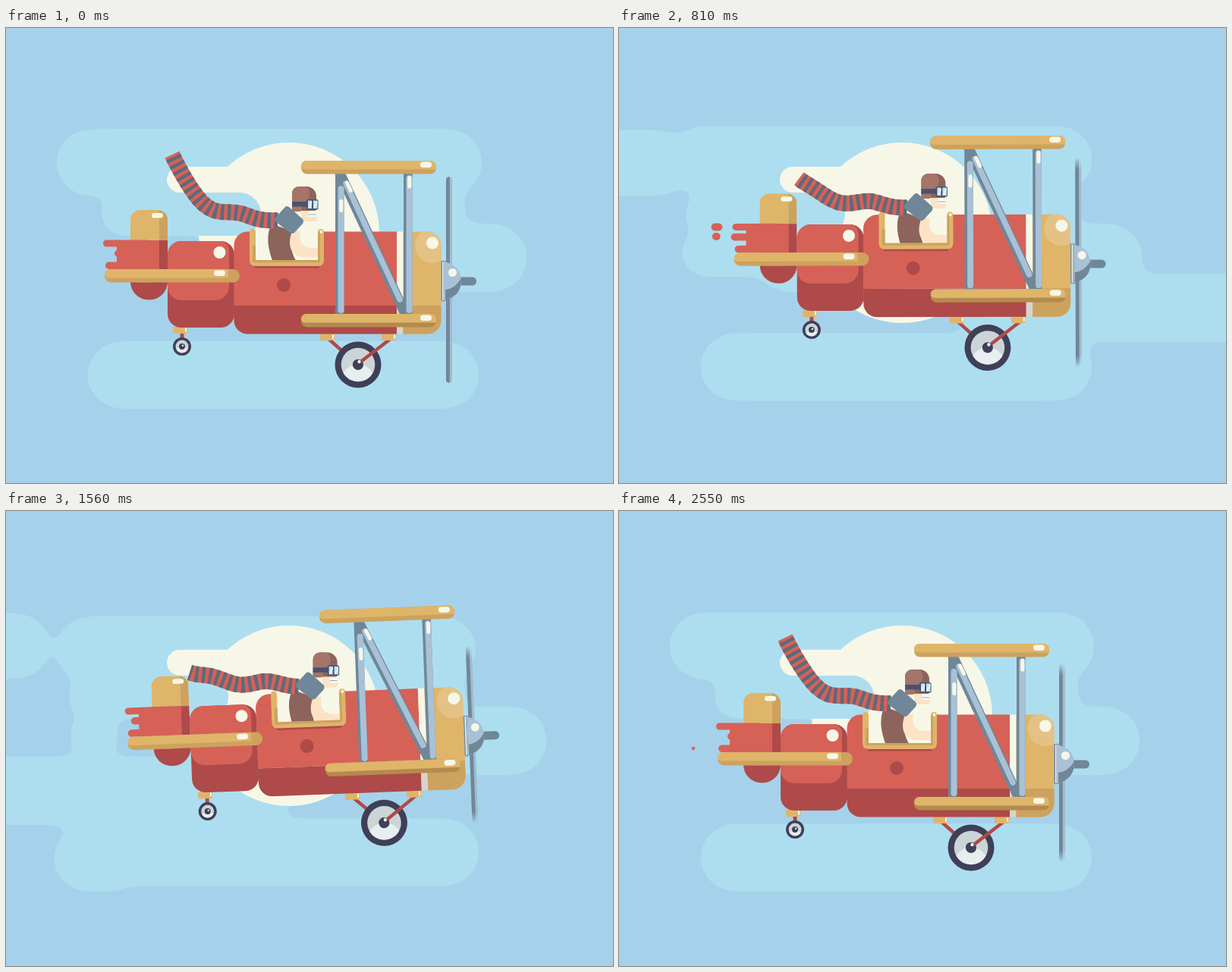
Animation of 800x600 px, one loop 2580 ms. Source, as an HTML page with a canvas:

```html
<!DOCTYPE html>
<html lang="en">
<head>
<meta charset="utf-8">
<title>Biplane</title>
<style>
  html, body { margin: 0; width: 100%; height: 100%; overflow: hidden; background: #a5d2ea; }
  svg, canvas { position: absolute; left: 0; top: 0; width: 800px; height: 600px; }
</style>
</head>
<body>
<svg id="sky" width="800" height="600" viewBox="0 0 800 600">
  <filter id="goo" filterUnits="userSpaceOnUse" x="-60" y="0" width="920" height="600" color-interpolation-filters="sRGB">
    <feGaussianBlur stdDeviation="10"/>
    <feColorMatrix values="0 0 0 0 .678  0 0 0 0 .871  0 0 0 0 .937  0 0 0 24 -11.3"/>
  </filter>
  <g id="clouds" filter="url(#goo)" stroke="#addeef"></g>
</svg>
<canvas id="stage" width="800" height="600"></canvas>
<script>
const LOOP = 2580, STEP = 30, TURN = 2 * Math.PI;
const C = {
  cloud: '#addeef', cream: '#f7f7e8', red: '#d66157', darkRed: '#ae4a49',
  gold: '#dfb56a', darkGold: '#cda25e', bronze: '#b58a4e', dome: '#e4c285',
  steel: '#6f8798', lightSteel: '#a9c1d6', ink: '#3f4058',
  brown: '#8c645c', helmet: '#a67468', skin: '#fce3c6', slate: '#5d6a7b'
};
const ctx = document.getElementById('stage').getContext('2d');
const lerp = (a, b, u) => a + (b - a) * u;

// Straight moves between [time, value] points, held at both ends.
function ramp(t, ...points) {
  const i = points.findIndex(([time]) => time > t);
  if (i === 0) return points[0][1];
  if (i < 0) return points[points.length - 1][1];
  const [t0, a] = points[i - 1], [t1, b] = points[i];
  return lerp(a, b, (t - t0) / (t1 - t0));
}

const shift = t => ramp(t, [0, 0], [1365, 36.4], [2550, 0]);
const tilt = t => ramp(t, [750, 0], [1890, -3.05], [2550, 0]);
const veil = t => ramp(t, [0, 0], [1250, 59], [2390, 0]);
const midFinger = t => 133 + 10 * Math.cos(2 * TURN * t / LOOP);

// Half the visible length of the blade, spinning 13 turns per loop with a slight sway
function bladeLength(t) {
  const turn = TURN * t / LOOP;
  return 150 * Math.abs(Math.cos(.44 + 13 * turn - .65 * Math.sin(turn) ** 2));
}

const sky = document.getElementById('clouds');
function cloud(left, right, top, height) {
  const el = document.createElementNS(sky.namespaceURI, 'path');
  el.setAttribute('stroke-width', height);
  el.setAttribute('stroke-linecap', 'round');
  sky.append(el);
  return t => {
    const r = height / 2, x0 = left(t) + r, x1 = Math.max(x0 + .1, right(t) - r);
    el.setAttribute('d', `M${x0} ${top(t) + r}H${x1}`);
  };
}
const stripEnd = t => 785 - .8 * (t - 1050);
const clouds = [
  // upper bank and the blob it sheds to the left
  cloud(() => 66, t => ramp(t, [570, 628], [1300, 616], [2100, 627]),
    t => ramp(t, [500, 133.5], [1050, 126], [1700, 142.5], [2500, 134]), 88),
  cloud(t => ramp(t, [200, 67], [570, 40], [1050, -150]),
    t => ramp(t, [0, 160], [1050, 76], [1560, 58], [1890, -60]), () => 135, 86),
  // veil in front of the sun and the puff below it
  cloud(t => 125 - veil(t), t => 336 - veil(t), () => 217, 57),
  cloud(t => ramp(t, [0, 260], [720, 82], [1560, 84], [1850, 260]),
    t => ramp(t, [0, 324], [1000, 250], [1560, 142], [1850, 324]), () => 264, 64),
  // middle bank and the filling above it
  cloud(t => ramp(t, [0, 300], [570, 185], [1050, 170], [1400, 300]),
    t => ramp(t, [700, 687], [1560, 713], [2400, 687]), () => 258, 90),
  cloud(() => 270, () => 606, () => 200, 80),
  // long strip passing through
  cloud(t => stripEnd(t) - 530, stripEnd, () => 324, 90),
  // lower bank and the blob it sheds
  cloud(() => 107, () => 624, t => ramp(t, [0, 413], [1150, 398], [1950, 412.5]), 89),
  cloud(t => ramp(t, [1050, 107], [1890, 34], [2250, -110]),
    t => ramp(t, [1050, 270], [1890, 124], [2280, -20]),
    t => ramp(t, [0, 414], [1050, 400], [1500, 414.5]), 87)
];

// Shape helpers; boxes are given by their edges
function box(color, x0, y0, x1, y1, r = 0) {
  ctx.fillStyle = color;
  ctx.beginPath();
  ctx.roundRect(x0, y0, x1 - x0, y1 - y0, r);
  ctx.fill();
}
const pill = (color, x0, y0, x1, y1) => box(color, x0, y0, x1, y1, Math.min(x1 - x0, y1 - y0) / 2);
function disc(color, x, y, r) {
  ctx.fillStyle = color;
  ctx.beginPath();
  ctx.arc(x, y, r, 0, TURN);
  ctx.fill();
}
function shape(color, d) {
  ctx.fillStyle = color;
  ctx.fill(new Path2D(d));
}
function line(color, width, d, cap = 'butt') {
  ctx.strokeStyle = color;
  ctx.lineWidth = width;
  ctx.lineCap = cap;
  ctx.stroke(new Path2D(d));
}
function clipped(x0, y0, x1, y1, r, draw) {
  ctx.save();
  ctx.beginPath();
  ctx.roundRect(x0, y0, x1 - x0, y1 - y0, r);
  ctx.clip();
  draw();
  ctx.restore();
}

function drawSun(t) {
  disc(C.cream, 373, 270, 119);
  box(C.cream, 212, 183, 310, 217, [17, 0, 0, 17]);
  box(C.cloud, 240, 217, 336 - veil(t), 274, [0, 28, 28, 0]);
  const p = (t - 850) / 400;
  if (p > 0 && p < 1) disc(C.cream, 212 - 92 * p, 201, 17 * Math.sqrt(1 - p));
}

// Droplets torn off the tail in bursts; the lowest row joins every second burst.
function drawDrops(t) {
  const rows = [[284, 91, 0], [296.5, 102, -60], [313, 98, 70]];
  [400, 740, 1780, 2140].forEach((burst, i) => rows.forEach(([y, rest, delay], row) => {
    const p = (t - burst - delay) / 420;
    if (p <= 0 || p >= 1 || (row === 2 && i % 2 === 0)) return;
    const r = 5 * (1 - p ** 3), w = r * (1 + Math.max(0, .9 - 2.5 * p));
    const x = lerp(132, rest, 1 - (1 - p) ** 5);
    pill(C.red, x - w, y - r, x + w, y + r);
  }));
}

function drawTail(t) {
  clipped(164, 240, 213, 358.5, [13, 13, 24, 24], () => {
    box(C.gold, 164, 240, 202, 280);
    box(C.darkGold, 202, 240, 213, 280);
    box(C.darkRed, 164, 280, 213, 359);
    box(C.red, 164, 280, 202, 336, [0, 0, 12, 12]);
  });
  pill(C.cream, 192, 244, 207, 250.5);
  box(C.red, 146, 280, 202, 318);
  pill(C.red, 128, 279.5, 190, 288.5);
  pill(C.red, midFinger(t), 292.5, 190, 302);
  pill(C.red, 131, 308.5, 190, 318);
  drawDrops(t);
}

function drawWheel(x, y, r, inner, hub) {
  disc(C.ink, x, y, r);
  disc('#cbd4d6', x, y, inner);
  clipped(x - inner, y - inner, x + inner, y + inner, inner,
    () => disc('#e8edef', x, y + inner, inner * 1.02));
  disc(C.ink, x, y, hub);
}

function drawGear() {
  box(C.darkRed, 229.5, 402, 234.5, 412);
  drawWheel(232, 420, 12, 8.5, 4);
  disc(C.cream, 233, 418.8, 1.2);
  line(C.darkRed, 4.5, 'M424 409L460 441');
  drawWheel(464, 444, 30.5, 22.3, 7);
  line(C.darkRed, 4.5, 'M508 409L465 442');
  disc(C.ink, 463.5, 443.5, 6.5);
  disc(C.cream, 465.5, 440, 2.2);
  for (const [x, y] of [[220, 394], [414, 403], [495, 403]]) {
    box(C.gold, x, y, x + 19, y + 9, 2);
    box(C.cream, x + 16, y + 1, x + 18, y + 7, 1);
  }
}

function drawFuselage() {
  box(C.darkRed, 213, 281, 301, 395, 18);
  box(C.red, 213, 281, 294, 359, [18, 12, 18, 18]);
  disc(C.cream, 281.5, 296, 8);
  clipped(300.5, 268.5, 573.5, 403.5, 18, () => {
    box(C.red, 300, 268, 515, 366);
    box(C.darkRed, 300, 366, 515, 404);
    box(C.cream, 515, 268, 523.5, 366);
    box('#d6d5cc', 515, 366, 523.5, 404);
    box(C.gold, 523.5, 268, 574, 404);
    box(C.darkGold, 523.5, 366, 574, 404);
    disc(C.dome, 562, 287, 23);
  });
  disc(C.cream, 562, 283.5, 8);
  disc(C.darkRed, 366, 339, 9);
  pill(C.darkGold, 130, 318, 308, 335.5);
  box(C.gold, 130, 318, 293, 329.5, [8, 4, 0, 5]);
  pill(C.cream, 274, 319.5, 289, 327);
  box(C.darkRed, 327, 312, 413, 316.5, 3);
  box(C.cream, 326, 268, 414, 309);
}

// The free end curls up and sinks as the plane climbs; a ripple runs towards it.
function drawScarf(t) {
  const s = shift(t), curl = 81 - 2.25 * s, length = 139 + .15 * s;
  let d = '';
  for (let u = 0; u <= 1.001; u += .025) {
    const x = 358 - length * u;
    const ripple = 4 * Math.min(1, 3 * u) * Math.cos(TURN * ((x - 264) / 85 + 3 * t / LOOP));
    const y = 248 + 6 * (1 - u) ** 3 - curl * u ** 4 + ripple * (1 - u ** 6);
    d += `${d ? 'L' : 'M'}${x} ${y}`;
  }
  line(C.red, 21, d);
  ctx.setLineDash([4.5, 4.5]);
  line(C.slate, 21, d);
  ctx.setLineDash([]);
}

function drawPilot(t) {
  shape(C.brown, 'M350 258C343 272 343 290 356 318H389C377 300 373 290 377 268Z');
  shape(C.skin, 'M378 266C370 284 374 301 392 302H414V290H402C389 289 386 280 388 268Z');
  drawScarf(t);
  shape(C.skin, 'M389 238H411L413 241H410V251Q410 255 405 255H390Z');
  shape(C.cream, 'M399 240H411V249H399Z');
  box(C.brown, 377, 209, 409, 241, [9, 13, 2, 3]);
  box(C.helmet, 377, 209, 400, 229, [9, 8, 8, 0]);
  box(C.helmet, 377, 234, 390, 242, [0, 0, 3, 3]);
  box('#4a5270', 377, 229, 398, 235.5);
  box('#4a5270', 396, 226, 411.5, 239.5, 2);
  box('#bfe3f3', 398, 227.5, 403, 238);
  box('#bfe3f3', 405, 227.5, 410.5, 238);
  line(C.cream, 1.6, 'M399 237L403 229M406 237L410 229');
  box('#ffffff', 399, 244, 409, 248, 1);
  line('#7ea3bd', 1, 'M399 246H409');
  shape(C.steel, 'M355 250L368 236Q370 234 373 236L391 252Q393 255 391 258L380 270Q377 272 374 270L355 255Q353 253 355 250Z');
}

function drawCockpit() {
  shape(C.gold, 'M321 269a4 4 0 0 1 8 0V306H411V269a4 4 0 0 1 8 0V306Q419 314 411 314H329Q321 314 321 306Z');
  shape(C.darkGold, 'M325 287H329V306H411V270H414V309H325Z');
  pill(C.cream, 414, 266.5, 417, 271);
}

function drawPropeller(t) {
  const half = bladeLength(t), x = 584, y = 332, fade = t ? Math.min(16, half / 2) : 0;
  const paint = rgb => {
    const g = ctx.createLinearGradient(0, y - half, 0, y + half);
    const edge = fade / (2 * half), end = fade ? 0 : 1;
    [[0, end], [edge, 1], [1 - edge, 1], [1, end]]
      .forEach(([stop, a]) => g.addColorStop(stop, `rgba(${rgb},${a})`));
    return g;
  };
  ctx.save();
  ctx.globalAlpha = Math.min(1, .25 + half / 130);
  box(paint('163,186,205'), x - 4, y - half, x + 4, y + half, 4);
  box(paint('111,135,152'), x - 4, y - half, x + .8, y + half, [4, 0, 0, 4]);
  ctx.restore();
  box(C.steel, 573.5, 307, 579.5, 360, 1);
  box(C.cream, 575, 308, 576.5, 359);
  box(C.lightSteel, 577, 308, 579, 359);
  pill(C.steel, 588, 328.5, 620, 339.5);
  shape(C.lightSteel, 'M579 308.5Q600 314 600 334Q600 353 579 358.5Z');
  shape(C.steel, 'M579 358.5V345Q592 344 600 330Q601 353 579 358.5Z');
  disc(C.cream, 588.5, 322.5, 5.5);
}

function drawWings() {
  clipped(430, 190, 540, 378, 0, () => {
    box(C.steel, 434, 190, 445.5, 378);
    line(C.steel, 13, 'M439 189L528 381');
    line(C.lightSteel, 7.5, 'M448 205L519 358', 'round');
    box(C.steel, 524, 190, 535.5, 378);
    pill(C.lightSteel, 437.5, 208, 445.5, 376);
    pill(C.lightSteel, 527.5, 194, 535.5, 376);
  });
  line(C.cream, 5, 'M449.5 204L454.5 214.5', 'round');
  pill(C.cream, 439.2, 226, 444.3, 243);
  pill(C.cream, 529.2, 195, 534.3, 211.5);
  for (const [y, shade] of [[175, C.darkGold], [377, C.bronze]]) {
    box(shade, 389, y, 567, y + 17.5, 8);
    box(C.gold, 389, y, 567, y + 11.5, [8, 8, 2, 6]);
    pill(C.cream, 546, y + 1.5, 561, y + 9);
  }
}

function draw(t) {
  clouds.forEach(update => update(t));
  ctx.setTransform(1, 0, 0, 1, 0, 0);
  ctx.clearRect(0, 0, 800, 600);
  drawSun(t);

  const s = shift(t);
  ctx.translate(437 + s, 336 - 1.04 * s);
  ctx.rotate(tilt(t) * TURN / 360);
  ctx.translate(-437, -336);
  drawTail(t);
  drawGear();
  drawFuselage();

  // The pilot rides with the cockpit but stays upright.
  clipped(0, 0, 800, 309, 0, () => {
    const seat = ctx.getTransform().transformPoint({ x: 395, y: 262 });
    ctx.setTransform(1, 0, 0, 1, seat.x - 395, seat.y - 262 + .25 * s);
    drawPilot(t);
  });
  drawCockpit();
  drawPropeller(t);
  ctx.translate(0, -.47 * s);
  drawWings();
}

const start = performance.now();
function frame() {
  const t = (performance.now() - start) % LOOP;
  draw(Math.floor(t / STEP) * STEP);
  requestAnimationFrame(frame);
}
frame();
</script>
</body>
</html>
```
